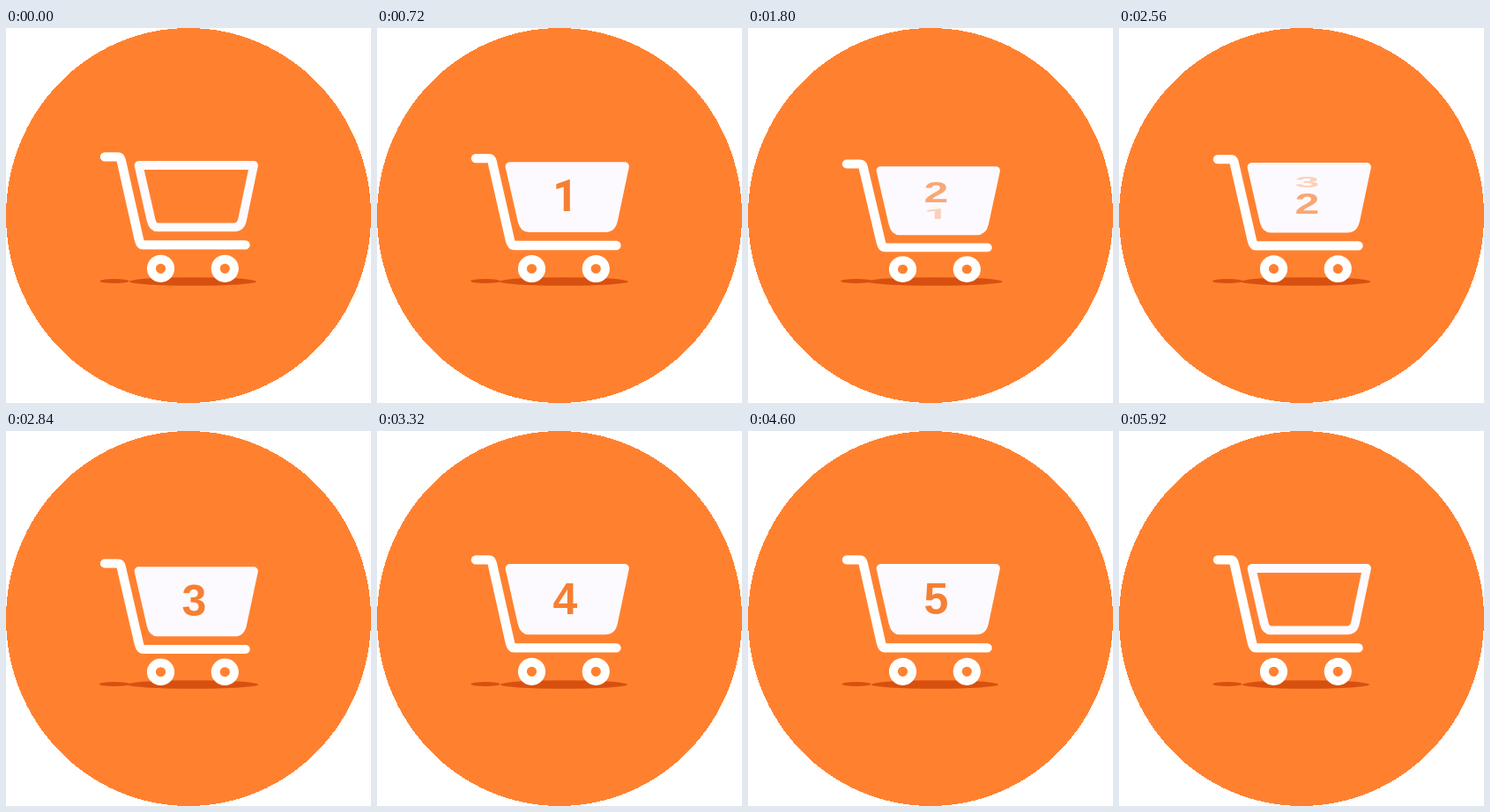
An HTML page that plays this animation: 414 by 426 pixels, repeating every 6 s.

```html
<!DOCTYPE html>
<html lang="en">
<head>
<meta charset="utf-8">
<title>Cart counter</title>
<style>
  html, body { margin: 0; width: 100%; height: 100%; overflow: hidden; background: #fff; }
  svg { display: block; width: 414px; height: 426px; }
  .line { fill: none; stroke: #fff; stroke-linecap: round; stroke-linejoin: round; }
  text { font: bold 50px "Liberation Sans", Arial, sans-serif; fill: #f67f32; text-anchor: middle; }
  .one { font-family: Roboto, sans-serif; }
</style>
</head>
<body>
<svg viewBox="0 0 414 426">
  <ellipse cx="207" cy="213" rx="207" ry="213" fill="#ff8130" shape-rendering="crispEdges"/>
  <g fill="#d8500f">
    <ellipse id="small" cx="123" cy="287.5" rx="16.5" ry="2.5"/>
    <ellipse id="big" cx="212" cy="288" rx="72" ry="4.8"/>
  </g>
  <g id="wheels" class="line" stroke-width="10">
    <circle cx="175.5" cy="273.3" r="10.6"/>
    <circle cx="248.3" cy="273.3" r="10.6"/>
  </g>
  <path id="frame" class="line" stroke-width="10.4"
    d="M112 146.4H127Q129.7 146.4 130.6 150L150.8 240Q152.3 246.4 155 246.4H271.5"/>
  <g id="basket">
    <path id="fill" fill="#fdfaff" d="M150.5 156H281L268 218Q266 226.3 259 226.3H172Q166.5 226.3 164.5 218Z"/>
    <path class="line" stroke-width="9.8" style="stroke:#fdfaff"
      d="M150.5 156H281L268 218Q266 226.3 259 226.3H172Q166.5 226.3 164.5 218Z"/>
    <g id="digits"></g>
  </g>
</svg>
<script>
const LOOP = 6000, STEP = 40, FLIP = 300, PEAK = 310, SETTLE = 430;
const starts = [320, 1600, 2460, 2890, 3560];
const leave = { at: 5500, time: 360 };

const $ = id => document.getElementById(id);
const clamp = x => Math.min(1, Math.max(0, x));
const ease = x => (1 - Math.cos(Math.PI * clamp(x))) / 2;

const digits = starts.map((_, i) => {
  const el = document.createElementNS("http://www.w3.org/2000/svg", "text");
  el.textContent = i + 1;
  if (!i) el.setAttribute("class", "one");
  el.setAttribute("y", 17.5);
  $("digits").append(el);
  return el;
});

// Vertical scale about a fixed height
const squash = (id, amount, y) =>
  $(id).setAttribute("transform", `translate(0 ${y * amount}) scale(1 ${1 - amount})`);

function press(t) {
  return Math.max(...starts.map(s => {
    const d = t - s;
    return d < 0 || d > SETTLE ? 0
      : d < PEAK ? ease(d / PEAK)
      : 1 - ease((d - PEAK) / (SETTLE - PEAK));
  }));
}

function render(t) {
  const q = press(t);
  squash("frame", 0.07 * q, 306);
  squash("basket", 0.035 * q, 391);
  squash("wheels", 0.065 * q, 289);
  $("big").setAttribute("rx", 72 + 6.5 * q);
  $("small").setAttribute("rx", 16.5 + 2 * q);

  const enter = i => clamp((t - starts[i]) / FLIP);
  const gone = clamp((t - leave.at) / leave.time);
  $("fill").setAttribute("opacity", enter(0) * (1 - gone));

  digits.forEach((el, i) => {
    const show = enter(i);
    const hide = i + 1 < starts.length ? enter(i + 1) : gone;
    const size = show * (1 - hide);
    const y = 190 + 25 * (hide - (1 - show));
    el.setAttribute("transform", `translate(213.5 ${y}) scale(1 ${Math.max(size, 0.001)})`);
    el.setAttribute("opacity", size);
  });
}

function tick() {
  render(Math.floor(performance.now() / STEP) * STEP % LOOP);
  requestAnimationFrame(tick);
}
tick();
</script>
</body>
</html>
```
